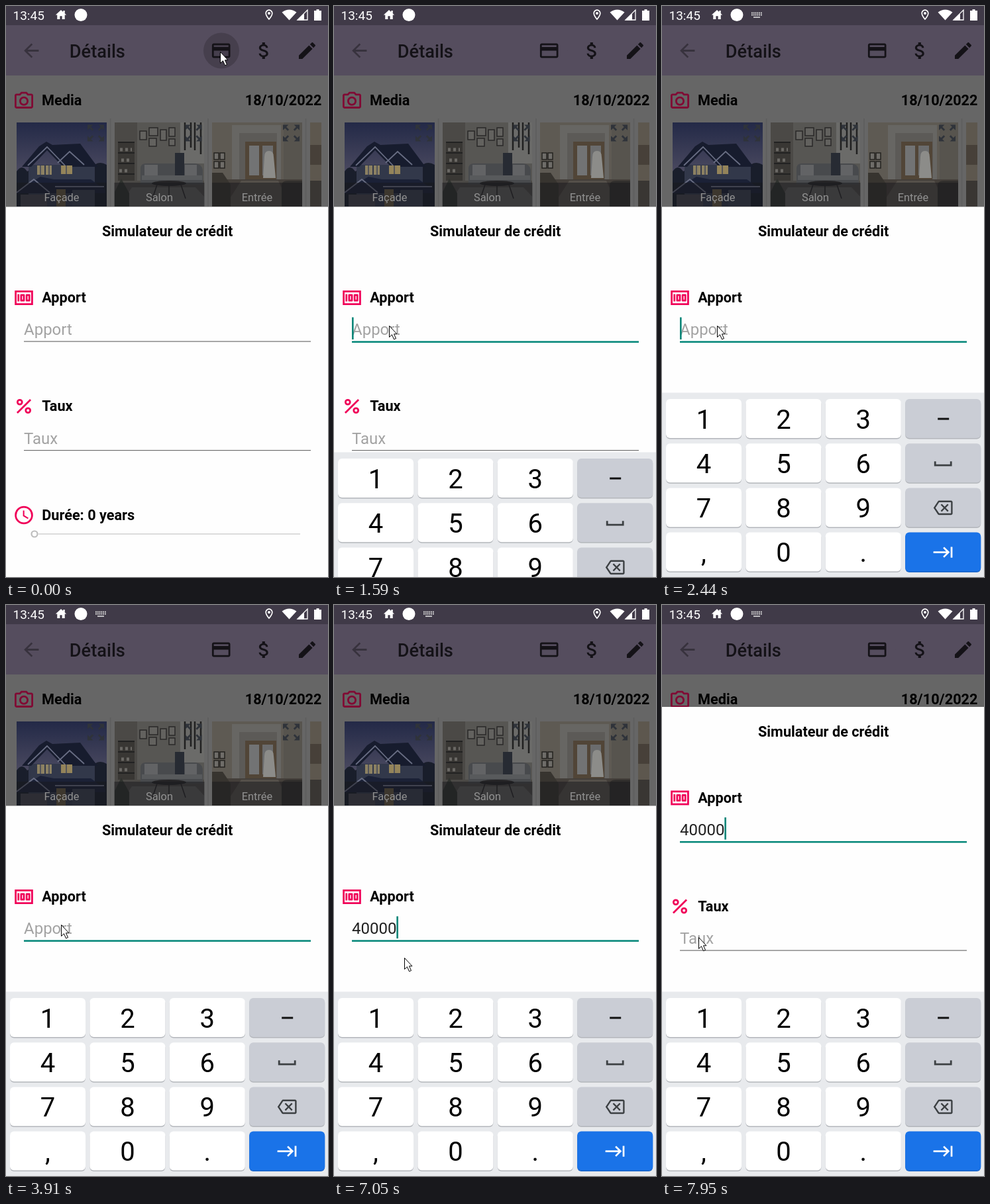
An HTML page that plays this animation: 486 px wide and 863 px high, repeating every 8000 ms.

```html
<!DOCTYPE html>
<html lang="fr">
<head>
<meta charset="utf-8">
<style>
html, body { margin: 0; width: 100%; height: 100%; overflow: hidden; background: #666 }
svg { display: block; width: 486px; height: 863px; font-family: Roboto, Arial, sans-serif }
.b { font-weight: 700; font-size: 21.7px }
.f { font-size: 24px }
.k { font-size: 40px; text-anchor: middle }
.l { font-size: 16.4px; text-anchor: middle; fill: #929292 }
</style>
</head>
<body>
<svg id="stage" viewBox="0 0 486 863"></svg>
<script>
const PINK = '#f00058', TEAL = '#008577', DIM = '#800a34', RULE = '#707070', HINT = '#a3a3a3';

const rect = (x, y, w, h, fill, more = '') =>
  `<rect x="${x}" y="${y}" width="${w}" height="${h}" fill="${fill}" ${more}/>`;
const path = (d, fill, more = '') => `<path d="${d}" fill="${fill}" ${more}/>`;
const line = (d, color, w, more = '') => path(d, 'none', `stroke="${color}" stroke-width="${w}" ${more}`);
const text = (s, x, y, cls, more = '') => `<text x="${x}" y="${y}" class="${cls}" ${more}>${s}</text>`;
// Places a 24-unit icon with its middle at (x, y)
const icon = (body, x, y, scale, fill) =>
  `<g transform="translate(${x} ${y}) scale(${scale}) translate(-12 -12)" fill="${fill}">${body}</g>`;
const shape = d => `<path d="${d}"/>`;

const ICONS = {
  back: shape('M20 11H7.83l5.59-5.59L12 4l-8 8 8 8 1.41-1.41L7.83 13H20z'),
  card: shape('M20 4H4c-1.11 0-1.99.89-1.99 2L2 18c0 1.11.89 2 2 2h16c1.11 0 2-.89 2-2V6c0-1.11-.89-2-2-2zm0 14H4v-6h16v6zm0-10H4V6h16v2z'),
  dollar: shape('M11.8 10.9c-2.27-.59-3-1.2-3-2.15 0-1.09 1.01-1.85 2.7-1.85 1.78 0 2.44.85 2.5 2.1h2.21c-.07-1.72-1.12-3.3-3.21-3.81V3h-3v2.16c-1.94.42-3.5 1.68-3.5 3.61 0 2.31 1.91 3.46 4.7 4.13 2.5.6 3 1.48 3 2.41 0 .69-.49 1.79-2.7 1.79-2.06 0-2.87-.92-2.98-2.1h-2.2c.12 2.19 1.76 3.42 3.68 3.83V21h3v-2.15c1.95-.37 3.5-1.5 3.5-3.55 0-2.84-2.43-3.81-4.7-4.4z'),
  pencil: shape('M3 17.25V21h3.75L17.81 9.94l-3.75-3.75L3 17.25zM20.71 7.04c.39-.39.39-1.02 0-1.41l-2.34-2.34c-.39-.39-1.02-.39-1.41 0l-1.83 1.83 3.75 3.75 1.83-1.83z'),
  camera: shape('M14.12 4l1.83 2H20v12H4V6h4.05l1.83-2h4.24M15 2H9L7.17 4H4c-1.1 0-2 .9-2 2v12c0 1.1.9 2 2 2h16c1.1 0 2-.9 2-2V6c0-1.1-.9-2-2-2h-3.17L15 2zm-3 7c1.65 0 3 1.35 3 3s-1.35 3-3 3-3-1.35-3-3 1.35-3 3-3m0-2c-2.76 0-5 2.24-5 5s2.24 5 5 5 5-2.24 5-5-2.24-5-5-5z'),
  expand: shape('M15 3l2.3 2.3-2.89 2.87 1.42 1.42L18.7 6.7 21 9V3zM3 9l2.3-2.3 2.87 2.89 1.42-1.42L6.7 5.3 9 3H3zM9 21l-2.3-2.3 2.89-2.87-1.42-1.42L5.3 17.3 3 15v6zM21 15l-2.3 2.3-2.87-2.89-1.42 1.42 2.89 2.87L15 21h6z'),
  money: shape('M15 16h3c.55 0 1-.45 1-1V9c0-.55-.45-1-1-1h-3c-.55 0-1 .45-1 1v6c0 .55.45 1 1 1zm1-6h1v4h-1v-4zm-7 6h3c.55 0 1-.45 1-1V9c0-.55-.45-1-1-1H9c-.55 0-1 .45-1 1v6c0 .55.45 1 1 1zm1-6h1v4h-1v-4zM5 8h2v8H5zM2 4v16h20V4H2zm18 14H4V6h16v12z'),
  percent: [7.5, 16.5].map(c => `<circle cx="${c}" cy="${c}" r="2.5" fill="none" stroke="${PINK}" stroke-width="2"/>`).join('') +
    shape('M4 18.59L18.59 4 20 5.41 5.41 20z'),
  clock: `<circle cx="12" cy="12" r="9" fill="none" stroke="${PINK}" stroke-width="2"/>` +
    shape('M12.5 7H11v6l5.25 3.15.75-1.23-4.5-2.67z'),
  home: shape('M10 20v-6h4v6h5v-8h3L19 9.3V4h-3v2.6L12 3 2 12h3v8z'),
  pin: shape('M12 2C8.13 2 5 5.13 5 9c0 5.25 7 13 7 13s7-7.75 7-13c0-3.87-3.13-7-7-7zM7 9c0-2.76 2.24-5 5-5s5 2.24 5 5c0 2.88-2.88 7.19-5 9.88C9.92 16.21 7 11.85 7 9z') +
    '<circle cx="12" cy="9" r="2.5"/>',
  erase: shape('M22 3H7c-.69 0-1.23.35-1.59.88L0 12l5.41 8.11c.36.53.9.89 1.59.89h15c1.1 0 2-.9 2-2V5c0-1.1-.9-2-2-2zm0 16H7.07L2.4 12l4.66-7H22v14zm-11.59-2L14 13.41 17.59 17 19 15.59 15.41 12 19 8.41 17.59 7 14 10.59 10.41 7 9 8.41 12.59 12 9 15.59z'),
  tab: shape('M11.59 7.41L15.17 11H1v2h14.17l-3.59 3.59L13 18l6-6-6-6-1.41 1.41zM20 6v12h2V6h-2z')
};

function statusBar() {
  return rect(0, 0, 486, 29, '#403a48') +
    text('13:45', 10.5, 21, '', 'font-size="19" fill="#fff"') +
    icon(ICONS.home, 83, 13.5, .82, '#fff') +
    '<circle cx="113" cy="13.5" r="9.5" fill="#fff"/>' +
    '<g id="kbIcon">' + line('M135 10.5h16M135 13.5h16', '#ddd', 1.8, 'stroke-dasharray="1.8 1"') +
    line('M138 17h10', '#ddd', 1.6) + '</g>' +
    icon(ICONS.pin, 397, 13.3, .8, '#fff') +
    path('M416.5 9.5Q427.5 1.5 438.5 9.5L427.5 21.5z', '#fff') +
    path('M440 21L455 6V21z', 'none', 'stroke="#fff" stroke-width="1.3"') +
    path('M440 21.5L450 11V21.5z', '#fff') +
    path('M465 7h3.5V5h4v2H476v15H465z', '#fff');
}

function toolBar() {
  const ink = '#141217';
  return rect(0, 28.5, 486, 76.5, '#554d5e') +
    '<circle id="hover" cx="325" cy="67.5" r="27" fill="#463f4d"/>' +
    icon(ICONS.back, 38.3, 67.5, 1.39, '#37323d') +
    text('Détails', 95.8, 77.5, '', `font-size="27.2" font-weight="500" fill="${ink}"`) +
    icon(ICONS.card, 324.7, 67.5, 1.38, ink) +
    icon(ICONS.dollar, 389.5, 67.5, 1.39, ink) +
    icon(ICONS.pencil, 454.5, 67.5, 1.39, ink);
}

function house() {
  const trim = '#686d83';
  return rect(16, 176, 136, 127, 'url(#dusk)') +
    path('M16 250q8-12 16 0l8-4v57H16zM128 246q10-14 24-6v63h-24z', '#191e2b') +
    path('M34 240h100v63H34z', '#32384a') +
    path('M24 243l26-31 11-7 9 5 42-2 26 35H86l-24-25-24 25z', '#171c2e') +
    line('M33 241l29-28 27 28M78 237l18-17 22 20', trim, 1.8) +
    path('M16 280l36-22 20 4h56l22 16v5H16z', '#1b2136') +
    line('M16 282l26-20 24 20M74 273h74', trim, 1.8) +
    rect(47, 241, 11, 14, '#8c8162') + rect(60, 241, 9, 14, '#8c8162') + rect(83, 241, 17, 13, '#94845a') +
    line('M52 241v14M65 241v14M91 241v13', '#40465a', 1.5) +
    rect(22, 285, 40, 18, '#43434c') + rect(76, 277, 14, 26, '#625740') + rect(100, 278, 34, 25, '#393e4e');
}

function lounge() {
  const frames = [[202, 189, 10, 13], [216, 184, 13, 12], [216, 200, 11, 12], [233, 187, 9, 16], [246, 184, 9, 13], [246, 201, 9, 10]];
  return rect(164, 176, 135, 127, '#575653') + rect(164, 176, 34, 94, '#4b4946') +
    rect(169, 206, 25, 62, '#393734') + line('M169 206h25M169 222h25M169 238h25M169 254h25', '#222', 2) +
    line('M172 217h18M174 233h14M171 249h16', '#6b6965', 5, 'stroke-dasharray="4 4"') +
    frames.map(f => rect(...f, '#63625f', 'stroke="#2a2928" stroke-width="1.5"')).join('') +
    rect(263, 176, 36, 62, '#6b6b69') + line('M270 176v42M279 176v38M285 176v42M294 176v48', '#202020', 2.5) +
    rect(164, 264, 135, 39, '#4b4946') +
    path('M203 246q0-8 8-8h74q10 0 12 10v22h-94z', '#484a4d') +
    path('M209 240h20v16h-20zM270 240h18v16h-18z', '#626365') +
    path('M255 222h14v34h-14z', '#272b33') +
    rect(205, 256, 91, 7, '#585a5c') + path('M190 274h96l13 14v15H172z', '#5d5c5a') +
    '<ellipse cx="246" cy="268" rx="26" ry="4" fill="#252426"/>' +
    line('M228 270l-7 21M264 270l7 21M246 272v20', '#252426', 1.5) +
    path('M164 303v-22l10-20 12 22v20z', '#2f322e');
}

function hall() {
  return rect(311, 176, 136, 127, '#5e5a53') + path('M341 180h74v82h-74z', '#676663') +
    rect(352, 192, 57, 70, '#5c5a57') + rect(361, 205, 47, 57, '#514537') +
    rect(367, 211, 15, 45, '#727374') + rect(387, 211, 16, 45, '#6b6c6d') +
    path('M390 228q0-9 7-9t7 9l3 32h-19z', '#8c8c89') +
    [[314, 222], [323, 222], [314, 235], [323, 235]].map(([x, y]) =>
      rect(x, y, 7, 10, '#6f6d69', 'stroke="#252321" stroke-width="1.5"')).join('') +
    rect(311, 262, 136, 41, '#443f3a') + path('M330 303l25-39h56l18 39z', '#55504a') +
    path('M311 252h16l12 18v33h-28z', '#37342f') + path('M416 272q0-8 9-8h22v39h-31z', '#312f2d') +
    rect(419, 176, 28, 86, '#57544e');
}

function media() {
  const names = ['Façade', 'Salon', 'Entrée'];
  return rect(0, 105, 486, 758, '#666') +
    icon(ICONS.camera, 27, 143.7, 1.4, DIM) +
    text('Media', 54, 150, 'b') + text('18/10/2022', 476.5, 150, 'b', 'text-anchor="end"') +
    line('M157.5 170v140M305 170v140M452.5 170v140', '#5e5e5e', 1.5) +
    house() + lounge() + hall() +
    rect(459, 176, 17, 127, '#5d574e') + rect(459, 210, 17, 30, '#474039') + rect(459, 264, 17, 39, '#393633') +
    names.map((n, i) => {
      const x = 16 + 147.5 * i;
      return rect(x, 267, 136, 36, 'rgba(25,25,28,.5)') + text(n, x + 68, 295, 'l') +
        icon(ICONS.expand, x + 119.5, 192, 1.39, '#2f333a');
    }).join('');
}

function sheet() {
  return '<g id="sheet">' + rect(0, 303.5, 486, 750, '#fefefe') +
    text('Simulateur de crédit', 243.7, 348, 'b', 'text-anchor="middle"') +
    icon(ICONS.money, 27, 441, 1.38, PINK) + text('Apport', 54.2, 448, 'b') +
    text('Apport', 27, 497, 'f', 'id="entry"') +
    rect(27, 506.4, 433, 1.2, RULE, 'id="rule"') +
    rect(27, 470.5, 2.6, 33.5, TEAL, 'id="caret"') +
    icon(ICONS.percent, 27, 605, 1.38, PINK) + text('Taux', 54.2, 612, 'b') +
    text('Taux', 27, 661.5, 'f', `fill="${HINT}"`) + rect(27, 671, 433, 1.2, RULE) +
    icon(ICONS.clock, 27, 769.5, 1.38, PINK) + text('Durée: 0 years', 54.2, 776.5, 'b') +
    line('M49 798H444', '#dcdcdc', 2) +
    '<circle cx="43" cy="798" r="4.5" fill="#fff" stroke="#bdbdbd" stroke-width="2.2"/></g>';
}

function keyboard() {
  const rows = ['123-', '456_', '789<', ',0.>'];
  const signs = {
    '-': (x, y) => line(`M${x - 8} ${y}h17`, '#111', 3),
    '_': (x, y) => line(`M${x - 12} ${y - 3}v6h24v-6`, '#3c4043', 2.8),
    '<': (x, y) => icon(ICONS.erase, x, y, 1.2, '#3c4043'),
    '>': (x, y) => icon(ICONS.tab, x + .5, y, 1.37, '#fff')
  };
  let out = rect(0, 584.5, 486, 400, '#e8eaed');
  rows.forEach((row, r) => [...row].forEach((c, i) => {
    const x = 6 + 120.4 * i, y = 594 + 67.2 * r, mx = x + 57, my = y + 30;
    const [fill, edge] = c === '>' ? ['#1a73e8', '#1864c8'] : [i === 3 ? '#cacdd5' : '#fff', '#b3b6bb'];
    out += rect(x, y + 1.5, 114, 59, edge, 'rx="6"') + rect(x, y, 114, 59, fill, 'rx="6"') +
      (signs[c] ? signs[c](mx, my) : text(c, mx, my + 14.5, 'k'));
  }));
  return `<g id="keys">${out}</g>`;
}

stage.innerHTML = `<defs><linearGradient id="dusk" x2="0" y2="1">
  <stop stop-color="#232947"/><stop offset=".6" stop-color="#4b4a60"/></linearGradient></defs>` +
  media() + toolBar() + statusBar() + sheet() + keyboard() +
  path('M.5 .5v17l4-3.7 3 7 3-1.3-3-6.7h4.5z', '#fff', 'id="pointer" stroke="#000"');

// Held steps: [start ms, value...]
const POINTER = [[0, 323, 69], [270, 311, 81], [420, 190, 270], [540, 75, 428], [790, 79, 470], [910, 83, 483],
  [6510, 86, 487], [6630, 96, 495], [6750, 104, 502], [6900, 104, 536], [7050, 106, 533], [7290, 104, 526],
  [7440, 97, 518], [7560, 88, 508], [7680, 76, 499], [7830, 63, 499], [7950, 55, 502]];
const SHEET = [[0, 0], [7170, -45], [7290, -97], [7440, -127], [7560, -143], [7680, -149.5]];
const KEYS = [[0, 300], [1590, 90], [1710, 4.7], [1860, 0]];
const TYPED = [[0, 0], [4220, 1], [4620, 2], [5270, 3], [5550, 4], [5860, 5]];
// The caret flips at each of these times
const BLINKS = [1470, 1860, 2440, 2970, 3350, 3910, 4220, 5150, 5270, 6510, 6900, 7440, 7830];

const at = (steps, t) => steps.filter(s => s[0] <= t).pop().slice(1);
const $ = id => document.getElementById(id);
const move = (id, x, y) => $(id).setAttribute('transform', `translate(${x} ${y})`);
const show = (id, on) => $(id).setAttribute('visibility', on ? 'visible' : 'hidden');

function draw(now) {
  const t = now % 8000, [typed] = at(TYPED, t), focused = t >= 1470;
  move('pointer', ...at(POINTER, t));
  move('sheet', 0, at(SHEET, t)[0]);
  move('keys', 0, at(KEYS, t)[0]);
  show('hover', t < 420);
  show('kbIcon', t >= 1860);
  show('caret', BLINKS.filter(b => b <= t).length % 2);
  $('caret').setAttribute('x', 27 + 13.47 * typed);
  $('entry').textContent = typed ? '40000'.slice(0, typed) : 'Apport';
  $('entry').setAttribute('fill', typed ? '#212121' : HINT);
  $('rule').setAttribute('fill', focused ? TEAL : RULE);
  $('rule').setAttribute('height', focused ? 2.5 : 1.2);
  requestAnimationFrame(draw);
}
requestAnimationFrame(draw);
</script>
</body>
</html>
```
